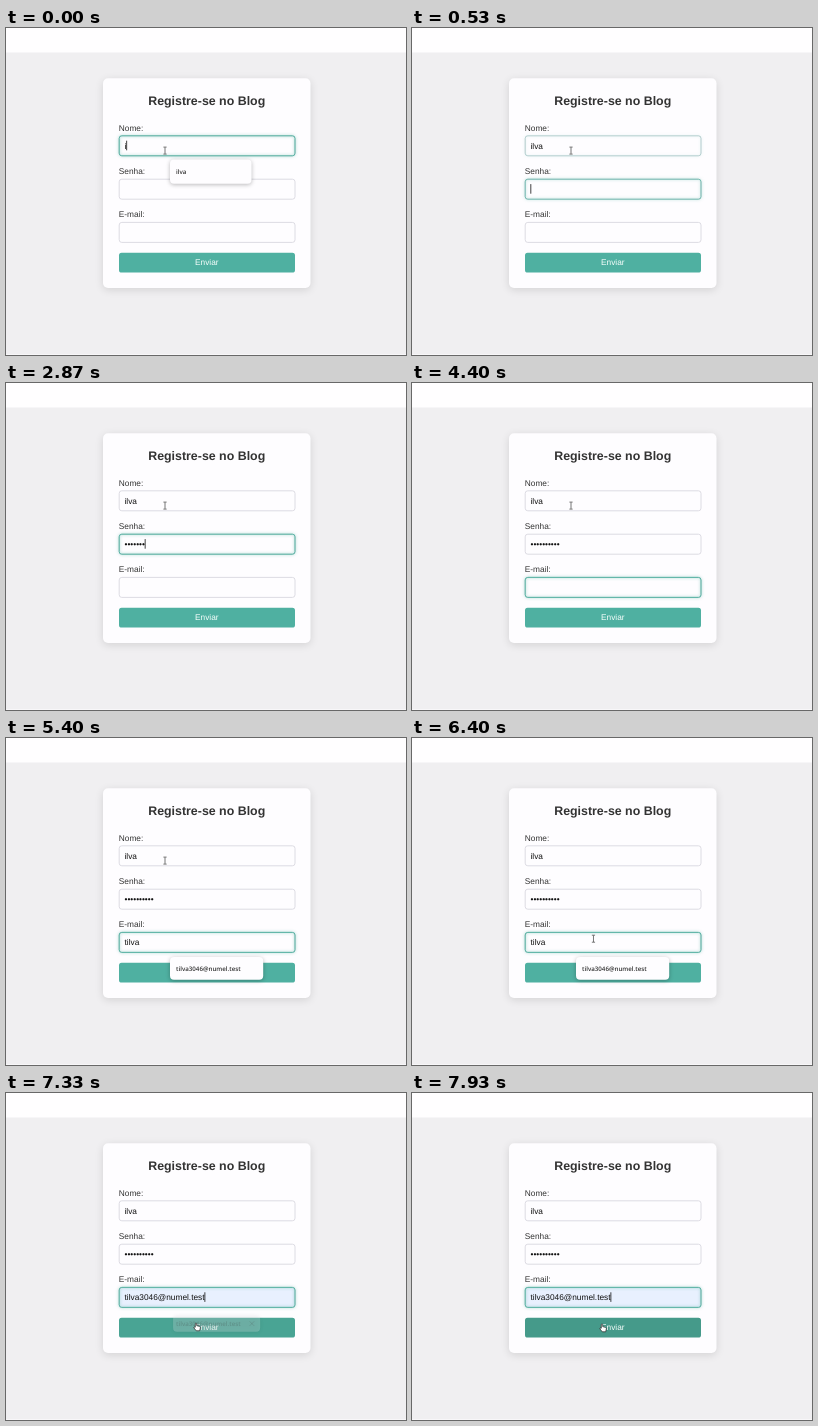
An HTML page with a canvas that plays this animation: 400x327 px, repeating every 8000 ms.

```html
<!DOCTYPE html>
<html lang="pt">
<head>
<meta charset="utf-8">
<title>Registre-se no Blog</title>
<style>
  html, body { margin: 0; height: 100%; overflow: hidden; background: #f0eff1; }
  canvas { display: block; width: 400px; height: 327px; }
</style>
</head>
<body>
<canvas></canvas>
<script>
const LOOP = 8000;
const SANS = '"Liberation Sans", Arial, sans-serif';
const UI = '"Open Sans", sans-serif';
const INPUT_FONT = `8.32px ${SANS}`;
const NAME = 'ilva';
const EMAIL = 'tilva3046@numel.test';

const canvas = document.querySelector('canvas');
const ctx = canvas.getContext('2d');
const ratio = window.devicePixelRatio || 1;
canvas.width = 400 * ratio;
canvas.height = 327 * ratio;
ctx.scale(ratio, ratio);
ctx.textRendering = 'geometricPrecision';

// Key presses and field focus, in ms
const nameKeys = [0, 70, 130, 200];
const passwordKeys = [1070, 1530, 1870, 2070, 2270, 2530, 2870, 3070, 3200, 3600];
const emailKeys = [4670, 4800, 4930, 5270, 5330];
const focusSpans = [[-1000, 330], [330, 3870], [3870, 9000]];
const caretOff = [[870, 1070], [4400, 4670], [5390, 7130], [7400, 7925]];
const MOVE_START = 5870, MOVE_END = 6670, PICK = 7130;

const fields = [
  { label: 'Nome:', y: 107.5 },
  { label: 'Senha:', y: 150.9 },
  { label: 'E-mail:', y: 194.1 }
];

const clamp = v => Math.max(0, Math.min(1, v));
const progress = (t, from, to) => clamp((t - from) / (to - from));
const ease = p => p * p * (3 - 2 * p);
const mix = (a, b, p) => a + (b - a) * p;
const mixColor = (a, b, p) => `rgb(${a.map((v, i) => Math.round(mix(v, b[i], p)))})`;
const typed = (text, keys, t) => text.slice(0, keys.filter(k => t >= k).length);

function box(x, y, w, h, r, fill, stroke, lineWidth = 0.8) {
  ctx.beginPath();
  ctx.roundRect(x, y, w, h, r);
  if (fill) { ctx.fillStyle = fill; ctx.fill(); }
  if (stroke) { ctx.strokeStyle = stroke; ctx.lineWidth = lineWidth; ctx.stroke(); }
}

function shadow(color, blur, offset = 0) {
  ctx.shadowColor = color;
  ctx.shadowBlur = blur * ratio;
  ctx.shadowOffsetY = offset * ratio;
}

function write(text, x, y, font, color, align = 'left') {
  ctx.font = font;
  ctx.fillStyle = color;
  ctx.textAlign = align;
  ctx.fillText(text, x, y);
}

function lines(color, width, ...paths) {
  ctx.beginPath();
  for (const [start, ...rest] of paths) {
    ctx.moveTo(...start);
    rest.forEach(p => ctx.lineTo(...p));
  }
  ctx.strokeStyle = color;
  ctx.lineWidth = width;
  ctx.stroke();
}

function drawField({ label, y }, value, focus, filled, caret) {
  write(label, 112.8, y - 4.9, INPUT_FONT, '#333');
  box(113.2, y + 0.3, 175.8, 20, 2.6, filled ? '#e8f0fe' : '#fefdff', '#d5d4dc');
  if (focus > 0) {
    ctx.save();
    ctx.globalAlpha = focus;
    shadow('rgba(76,175,158,.8)', 3);
    box(113.2, y + 0.3, 175.8, 20, 2.6, null, '#4fb0a0', 0.9);
    ctx.restore();
  }
  write(value, 118.5, y + 13.2, INPUT_FONT, '#111');
  if (caret) {
    const x = 118.8 + ctx.measureText(value).width;
    lines('#111', 0.8, [[x, y + 5.2], [x, y + 14.8]]);
  }
}

function drawPopup(text, y, w, h, alpha, hovered, shrink = 0) {
  if (alpha <= 0) return;
  ctx.save();
  ctx.globalAlpha = alpha;
  shadow('rgba(0,0,0,.28)', 4, 1);
  box(164 + shrink, y + shrink, w - 2 * shrink, h - 2 * shrink, 4, hovered ? '#f0f0f3' : '#fefdff');
  shadow('transparent', 0);
  write(text, 170, y + h / 2 + 2.6, `600 6.2px ${UI}`, '#333');
  if (hovered) {
    const cy = y + h / 2 + 0.2;
    lines('#444', 0.8, [[243.6, cy - 2.3], [248.2, cy + 2.3]], [[248.2, cy - 2.3], [243.6, cy + 2.3]]);
  }
  ctx.restore();
}

function drawPointer(kind, x, y) {
  ctx.save();
  ctx.translate(x, y);
  if (kind === 'beam') {
    lines('#555', 0.8, [[0, -3], [0, 3.6]], [[-1.6, -3.2], [1.6, -3.2]], [[-1.6, 3.8], [1.6, 3.8]]);
  } else {
    ctx.fillStyle = '#fff';
    ctx.strokeStyle = '#222';
    ctx.lineWidth = 0.7;
    ctx.lineJoin = 'round';
    const shape = kind === 'hand'
      ? 'M-.7 4.2V.4Q0-.6.7.4V2.6L3.6 3.4Q4.5 3.7 4.4 4.7L3.7 7.8H.3L-2.2 4.8Q-2.3 3.5-.7 4.2Z'
      : 'M0 0V7.4L1.7 5.8 2.9 8.4 4.1 7.9 3 5.4H5.3Z';
    const path = new Path2D(shape);
    ctx.fill(path);
    ctx.stroke(path);
  }
  ctx.restore();
}

function draw(t) {
  const travel = ease(progress(t, MOVE_START, MOVE_END));
  const pointer = { x: mix(159, 189.5, travel), y: mix(122.3, 228.3, travel) };
  const hovered = pointer.y > 219;
  const picked = t >= PICK;

  ctx.fillStyle = '#f0eff1';
  ctx.fillRect(0, 0, 400, 327);
  ctx.fillStyle = '#fffeff';
  ctx.fillRect(0, 0, 400, 24.5);
  ctx.fillStyle = '#f8f7f9';
  ctx.fillRect(0, 326, 400, 1);

  ctx.save();
  shadow('rgba(0,0,0,.12)', 9, 2);
  box(97, 50.3, 207.5, 209.7, 5, '#fefdff');
  ctx.restore();
  write('Registre-se no Blog', 200.7, 77, `bold 12.4px ${SANS}`, '#333', 'center');

  const values = [
    typed(NAME, nameKeys, t),
    typed('•'.repeat(10), passwordKeys, t),
    hovered ? EMAIL : typed(EMAIL, emailKeys, t)
  ];
  const caretOn = !caretOff.some(([from, to]) => t >= from && t < to);
  fields.forEach((field, i) => {
    const [from, to] = focusSpans[i];
    const focus = ease(progress(t, from, from + 300)) * (1 - ease(progress(t, to, to + 300)));
    drawField(field, values[i], focus, i === 2 && hovered, caretOn && t >= from && t < to);
  });

  const buttonHover = ease(progress(t, 7170, 7470));
  box(113, 224.8, 176, 19.8, 2.6, mixColor([79, 176, 161], [69, 154, 138], buttonHover));
  write('Enviar', 200.8, 237.3, INPUT_FONT, '#f8fffd', 'center');

  drawPopup(NAME, 131.5, 81.5, 24.3, 1 - progress(t, 330, 480), false);
  const closing = progress(t, PICK, PICK + 260);
  drawPopup(EMAIL, 219, 93.2, 22.8, progress(t, 4660, 4730) * (1 - closing), hovered, closing * 4);

  const overField = fields.some(f => pointer.y > f.y && pointer.y < f.y + 20.5);
  const onButton = picked && t >= 7270;
  if (onButton) {
    pointer.x = 190;
    pointer.y = t >= 7870 ? 231 : 230;
  }
  drawPointer(onButton ? 'hand' : overField ? 'beam' : 'arrow', pointer.x, pointer.y);
}

const start = performance.now();
function tick() {
  draw((performance.now() - start) % LOOP);
  requestAnimationFrame(tick);
}
tick();
</script>
</body>
</html>
```
